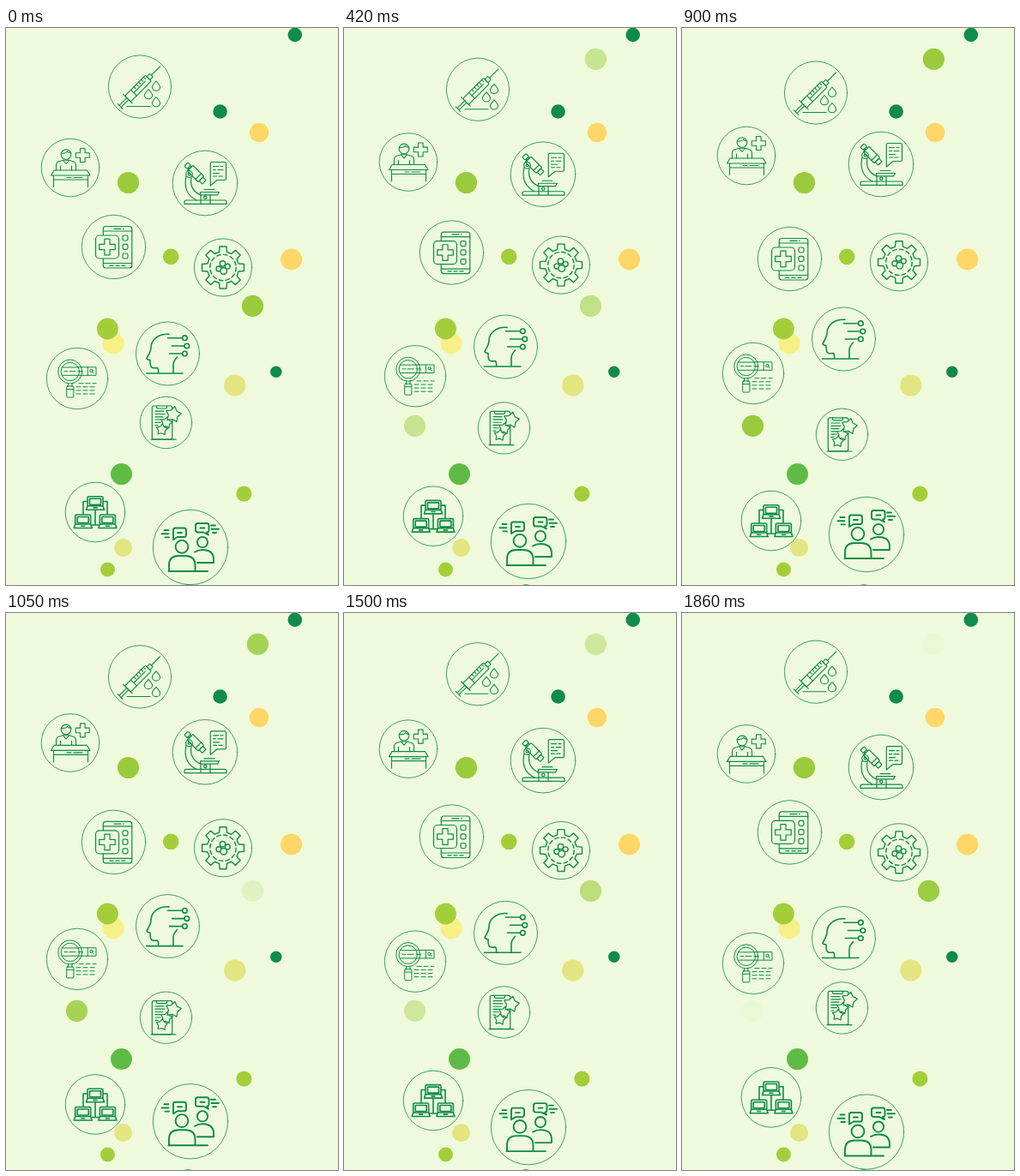
Recreate the animation shown at these times as an HTML page. Size 387 px wide and 650 px high, loop 1890 ms.

```html
<!DOCTYPE html>
<html lang="en">
<head>
<meta charset="utf-8">
<title>Floating health icons</title>
<style>
  html, body { margin: 0; width: 100%; height: 100%; overflow: hidden; background: #eefadb; }
  svg { display: block; width: 387px; height: 650px; }
  .icon { fill: none; stroke: #0f8c47; stroke-linecap: round; stroke-linejoin: round; }
  .solid { fill: #eefadb; }
</style>
</head>
<body>
<svg id="stage" viewBox="0 0 387 650"></svg>
<script>
const LOOP = 1890, TURN = 900, STEP = 30;
const stage = document.getElementById('stage');

const path = (d, attrs = '') => `<path d="${d}" ${attrs}/>`;
const circle = (x, y, r, attrs = '') => `<circle cx="${x}" cy="${y}" r="${r}" ${attrs}/>`;
const rect = (x, y, w, h, r = 0, attrs = '') =>
  `<rect x="${x}" y="${y}" width="${w}" height="${h}" rx="${r}" ${attrs}/>`;
const SOLID = 'class="solid"';

function plus(x, y, arm, half) {
  const s = arm - half, w = 2 * half;
  return path(`M${x - half} ${y - arm}h${w}v${s}h${s}v${w}h${-s}v${s}h${-w}v${-s}h${-s}v${-w}h${s}z`);
}

function polar(x, y, points) {
  return 'M' + points.map(([r, a]) =>
    `${(x + r * Math.cos(a)).toFixed(2)} ${(y + r * Math.sin(a)).toFixed(2)}`).join('L') + 'z';
}

function star(x, y, r, tilt) {
  const points = Array.from({ length: 10 }, (_, i) =>
    [i % 2 ? r * 0.6 : r, tilt - Math.PI / 2 + i * Math.PI / 5]);
  return path(polar(x, y, points), SOLID);
}

function gear(x, y, outer, inner) {
  const points = [];
  for (let i = 0; i < 8; i++) {
    const a = i * Math.PI / 4;
    points.push([inner, a - 0.24], [outer, a - 0.16], [outer, a + 0.16], [inner, a + 0.24]);
  }
  return path(polar(x, y, points));
}

const drop = (x, y) => path(`M${x} ${y - 6}q4.6 5 4.6 7a4.6 4.2 0 0 1 -9.2 0q0 -2 4.6 -7z`);

const laptop = (x, y) =>
  rect(x - 9, y, 18, 11.5, 1.5, SOLID) + rect(x - 6.5, y + 2.5, 13, 7, 0.5) +
  path(`M${x - 9} ${y + 11}h18l1.5 4.5h-21z`, SOLID) + path(`M${x - 2} ${y + 13.2}h4`);

const syringe = () =>
  `<g transform="translate(156 68.5) rotate(-45)">` +
  path('M19 0H33.5M-20 -7.5V7.5M-32.5 -4V4M-20 -1.5H-32M-20 1.5H-32') +
  rect(-20, -4.8, 34, 9.6, 1) + rect(14, -2.6, 5, 5.2, 0.5) +
  path('M-10 -4.8V4.8M-10 0H9M-5 -4.8v3M-1 -4.8v3M3 -4.8v3M7 -4.8v3M11 -4.8v3') + '</g>' +
  drop(175, 68) + drop(166, 77.5) + drop(175, 86.5) + path('M141 91.5H168');

const desk = () =>
  circle(70, 147.5, 5.8) + path('M64.3 146q5 1 7.5 -2q1.5 2 4 2') +
  path('M58.5 166V160q0 -4 5 -4.7l3 -1h7l3 1q5 .7 5 4.7V166M66.5 154.5l3.5 4l3.5 -4M63.5 161v5M76.5 161v5') +
  plus(89.3, 148.5, 8, 2.8) +
  path('M56 166H94.5L98 172H52.5zM55.5 172V185.5M95.5 172V185.5M55.5 177H95.5M71 174.5h5M79 174.5h10');

const microscope = () =>
  `<g transform="translate(221 170) rotate(45)">` +
  rect(-9, -4.7, 18, 9.4, 1) + rect(-15.5, -3, 4.5, 6, 1) + rect(9, -3, 5, 6, 0.5) +
  path('M-11 -2h2M-11 2h2M4.5 -4.7V4.7') + '</g>' +
  circle(213.5, 170.5, 3.8) + circle(213.5, 170.5, 1.4) +
  path('M210 173C207 187 212 196 222 201M216 174C214 185 218 191 227 195M212 166l2 -3') +
  path('M231 188.5H243M226.5 191.5H248.5L246.5 194.8H226.5zM227 195V205M238 195V205M208 205.3V203q0 -2 2 -2H255q2 0 2 2V205.3z') +
  circle(232.3, 197.8, 1.7) +
  path('M240 156.5H255q1.5 0 1.5 1.5V176q0 1.5 -1.5 1.5H246L238.3 184V158q0 -1.5 1.7 -1.5z') +
  path('M241.5 161.5h6M250 161.5h3M241.5 165.5h3M247 165.5h6M241.5 169.5h7M241.5 173h4M248 173h4');

const phone = () =>
  rect(113.3, 231.5, 33.5, 48.5, 3) + path('M113.3 237H146.8M113.3 274.5H146.8M126 234.3h8M136.5 234.3h.8M121 277.3h4M128 277.3h4M135 277.3h4') +
  rect(104.5, 242, 27, 27, 4.5, SOLID) + plus(118, 255.5, 9.3, 3.1) +
  [242, 252.3, 263].map(y => rect(136, y, 6, 6, 1.8)).join('');

const cog = () =>
  gear(253, 279.5, 24.8, 18.7) + circle(253, 279.5, 15.2, 'stroke-dasharray="4.6 3.36"') +
  [[252.5, 275, 3.2], [258.3, 278.2, 2.9], [248, 281, 3], [253.7, 283.5, 3.8]]
    .map(c => circle(...c, SOLID)).join('');

const head = () =>
  path('M190 357.3C178 356.5 169 363.5 169 373C169 378 165.5 382 164 385.5Q164 387 168 387.5C168 391 168 393 169 395Q170 397.5 176.5 396.5Q178 398 177.5 403M163.5 403H206M195 402V393Q195 389 199.5 384') +
  path('M188.5 361.7H205.3M193.5 371H207.5M190.5 380H205.3') +
  circle(208.4, 361.7, 2.8) + circle(210.8, 371, 2.8) + circle(208.4, 380, 2.8);

const search = () =>
  path('M84 395.8H105V405.3H84M95.3 395.8V405.3') + circle(99.5, 400, 1.7) + path('M100.8 401.4l1.7 1.7') +
  circle(74.8, 401, 14) + circle(74.8, 401, 10.7) +
  path('M65.5 396H84M65.5 405.3H84M68 400.7H72M74 400.7H81M84 400.7H89') +
  path('M72.5 415V418.5M77 415V418.5') + rect(70.7, 418, 8.2, 13, 1) + path('M70.7 421.5h8.2') +
  path('M85 414.7H105M82 418.8H105M82 422.9H105M82 427H105', 'stroke-dasharray="5 3"');

const review = () =>
  rect(170.3, 441, 23.5, 39, 2) + path('M175.5 441v1.5q0 1.5 1.5 1.5h9q1.5 0 1.5 -1.5V441') +
  path('M174 447.2h10M174 450.5h11M174 453.8h9M174 457h7M174 460.3h6M174 463.6h3M169 480.2H198') +
  star(187, 460.5, 7, 0.2) + star(195, 451, 9.4, 0.2) + star(181.7, 468.7, 6.8, 0.1);

const network = () =>
  path('M95 552.5H90V568M113 552.5H118V568M104 562V580M99 580H109') +
  laptop(104, 546.7) + laptop(89.7, 568) + laptop(118.4, 568);

const people = () =>
  circle(229, 600, 6.1) + path('M220 611.5Q224 609 229 609Q242 609 242 620V624H223') +
  circle(205, 605.3, 7.4) + path('M190 634V627Q190 616 201 616H209Q220.5 616 220.5 627V634M189.5 634H235') +
  path('M197 583.5H207.5q2.5 0 2.5 2.5V591.5q0 2.5 -2.5 2.5H200L195 597V586q0 -2.5 2 -2.5zM200 589h5') +
  path('M223.5 578H234q2.5 0 2.5 2.5V586q0 2.5 -2.5 2.5L236 591.5L230 588.5H223.5q-2.5 0 -2.5 -2.5V580.5q0 -2.5 2.5 -2.5zM226.5 583.5h5') +
  path('M184.5 586h5M181.5 590.2h8M185.5 594.4h4.5M239 580.5h5M239.5 584.7h8.5M241 589h4');

// x, radius, height at start / turn / end, line weight, drawing
const icons = [
  [156, 36.6, 68.5, 75.5, 68.5, 1.1, syringe],
  [75, 33.8, 163, 149, 164.9, 1.1, desk],
  [232, 37.8, 181, 159, 180.7, 1.2, microscope],
  [125.5, 37.2, 255.5, 269.5, 255.5, 1.2, phone],
  [253, 33.6, 279.5, 273.3, 279.5, 1.4, cog],
  [188.5, 37, 380, 363, 380, 1.6, head],
  [83, 35.7, 409, 403, 409, 1, search],
  [186.5, 30.2, 460.5, 474.3, 460.5, 1.2, review],
  [104, 34.8, 565, 575, 565, 1.6, network],
  [215, 43.7, 606, 591, 606, 1.9, people],
];

const DARK = '#0f8c47', AMBER = '#ffd668', LEAF = '#9acb3c', LIME = '#a4ce39', STRAW = '#e3e580';
// x, y, radius, colour, fade direction
const dots = [
  [336.8, 8, 8.3, DARK], [249.6, 97.5, 8.3, DARK], [295, 122, 11.2, AMBER],
  [142.5, 180.5, 12.6, LEAF], [192.2, 266.8, 9.3, LIME], [332.6, 270, 12.5, AMBER],
  [125, 368, 12.5, '#f7f087'], [118.4, 351, 12.5, LIME], [314.8, 401.2, 6.7, DARK],
  [266.8, 417, 12.6, STRAW], [134.5, 520.6, 12.5, '#5fbb46'], [277.4, 543.6, 9.1, LIME],
  [136.6, 606.5, 10.5, STRAW], [118.5, 632, 8.5, LIME], [212, 661.7, 12.4, DARK],
  [287.5, 324.4, 12.6, LEAF, 'out'], [293.4, 36.4, 12.6, LEAF, 'in'], [82.5, 464.3, 12.6, LEAF, 'in'],
];

stage.innerHTML =
  dots.map(([x, y, r, color, fade = '']) => circle(x, y, r, `fill="${color}" data-fade="${fade}"`)).join('') +
  icons.map(([x, r, y, , , weight, draw]) =>
    `<g class="icon" stroke-width="${weight}">${circle(x, y, r, 'stroke-width=".8"')}${draw()}</g>`).join('');

const groups = stage.querySelectorAll('.icon');
const fadeOut = stage.querySelectorAll('[data-fade=out]');
const fadeIn = stage.querySelectorAll('[data-fade=in]');

const between = (t, start, turn, end) => t < TURN
  ? start + (turn - start) * t / TURN
  : turn + (end - turn) * (t - TURN) / (LOOP - TURN);

function render(time) {
  const t = Math.floor((time % LOOP) / STEP) * STEP;
  icons.forEach(([, , start, turn, end], i) => {
    const dy = between(t, start, turn, end) - start;
    groups[i].setAttribute('transform', `translate(0 ${dy.toFixed(3)})`);
  });
  const shown = between(t, 0, 1, 0);
  fadeIn.forEach(dot => dot.setAttribute('opacity', shown));
  fadeOut.forEach(dot => dot.setAttribute('opacity', 1 - shown));
}

let origin;
function tick(now) {
  origin ??= now;
  render(Math.max(0, now - origin));
  requestAnimationFrame(tick);
}
render(0);
requestAnimationFrame(tick);
</script>
</body>
</html>
```
